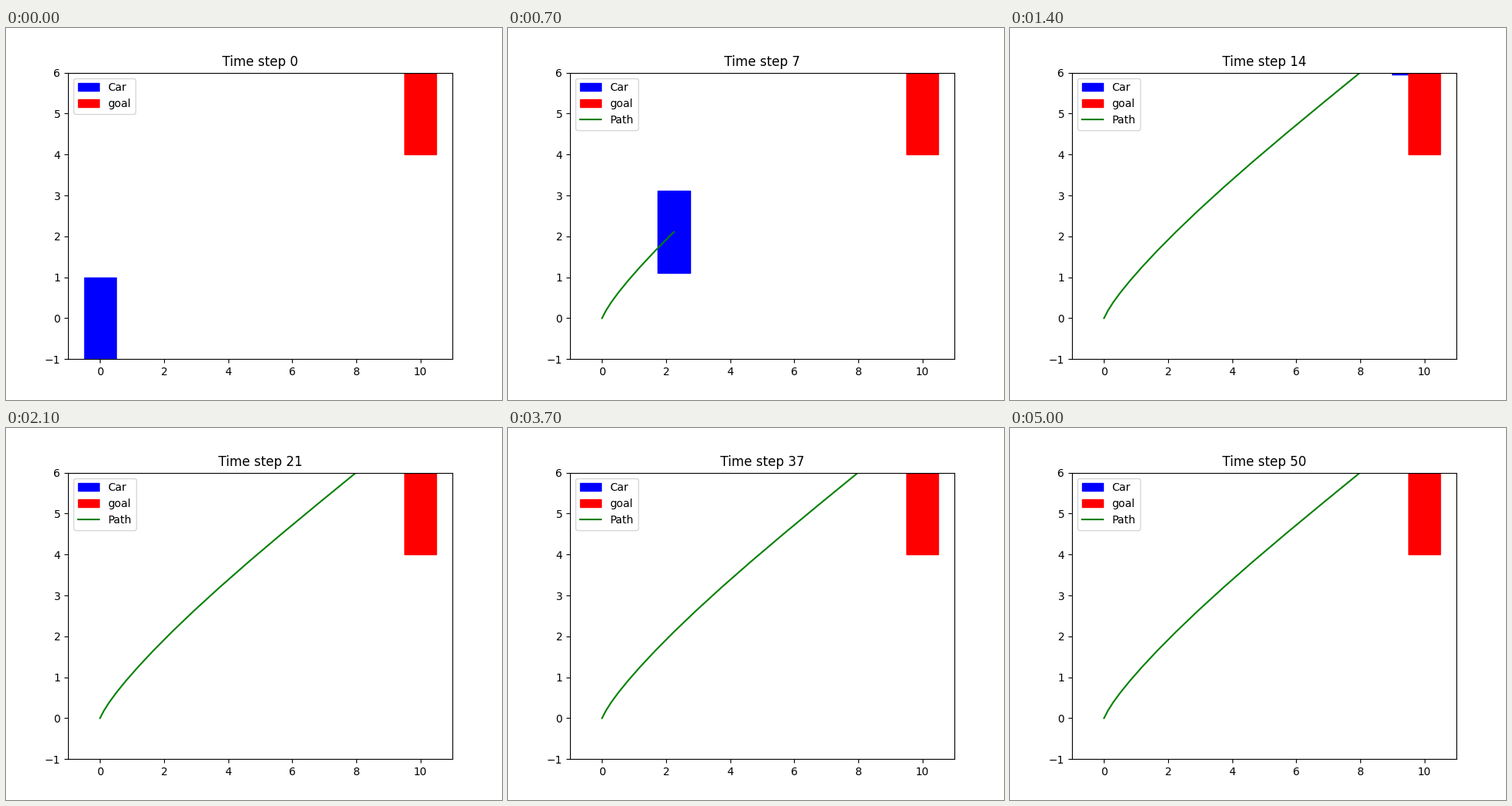
Write a matplotlib script that moves like this. It is 640x480 px and loops after 5100 ms.

```python
import numpy as np
import matplotlib.pyplot as plt
from matplotlib.animation import FuncAnimation
from matplotlib.patches import Rectangle

STEPS = 51
INTERVAL = 100
CAR_W, CAR_H = 1, 2
GOAL = (10, 5)

# Positions at a few steps; the mean speed since the start is a smooth curve.
KEY_STEPS = np.array([2, 4, 6, 10, 12, 14])
KEY_X = np.array([0.28, 0.81, 1.66, 4.655, 6.84, 9.49])
KEY_Y = np.array([0.376, 0.922, 1.64, 3.835, 5.26, 6.96])


def trajectory(keys, steps):
    speed = np.polyfit(KEY_STEPS, keys / KEY_STEPS, 4, w=KEY_STEPS)
    return steps * np.polyval(speed, steps)


# Beyond the last key step the car has left the view, so it keeps its last speed.
steps = np.arange(STEPS)
near = np.minimum(steps, 15)


def path_coords(keys):
    pos = trajectory(keys, near)
    return pos + (steps - near) * (pos[15] - pos[14])


path_x, path_y = path_coords(KEY_X), path_coords(KEY_Y)

fig, ax = plt.subplots(figsize=(6.4, 4.8), dpi=100)


def add_box(center, color, label):
    corner = (center[0] - CAR_W / 2, center[1] - CAR_H / 2)
    ax.add_patch(Rectangle(corner, CAR_W, CAR_H, color=color, label=label))


def draw(step):
    ax.clear()
    ax.set_xlim(-1, 11)
    ax.set_ylim(-1, 6)
    add_box((path_x[step], path_y[step]), "blue", "Car")
    add_box(GOAL, "red", "goal")
    if step > 0:
        ax.plot(path_x[:step + 1], path_y[:step + 1], color="green", label="Path")
    ax.set_title(f"Time step {step}")
    ax.legend(loc="upper left")
    return ax.get_children()


anim = FuncAnimation(fig, draw, frames=STEPS, interval=INTERVAL,
                     init_func=lambda: draw(0), repeat=True, repeat_delay=0)
plt.show()
```
